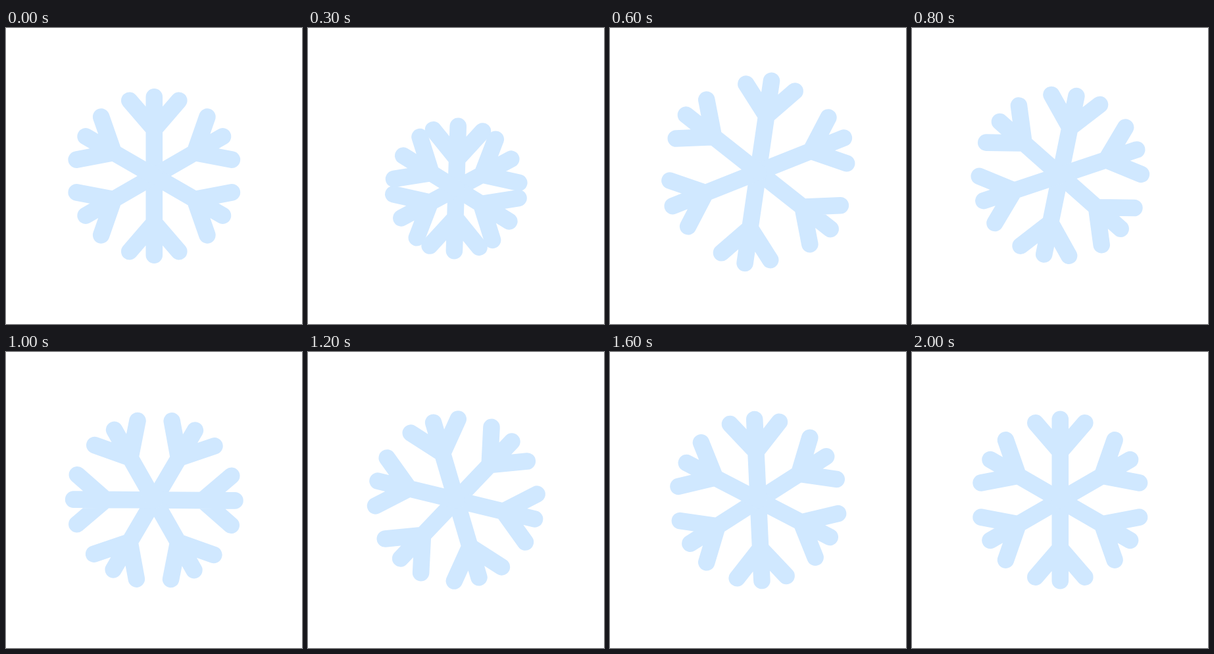
Animation of 450x450 px, one loop 2900 ms. Source, as an HTML page:

```html
<!DOCTYPE html>
<html lang="en">
<head>
<meta charset="utf-8">
<title>Snowflake</title>
<style>
  html, body { margin: 0; width: 100%; height: 100%; overflow: hidden; background: #fff; }
  svg { display: block; width: 100%; height: 100%; }
  path { fill: none; stroke: #d0e8ff; stroke-width: 25.6; stroke-linecap: round; }
</style>
</head>
<body>
<svg viewBox="0 0 450 450"><g id="flake"></g></svg>
<script>
const LOOP = 2900, MOVE = 2000, STEP = 100;
const CENTER = 225.3, ARM = 122.7, REACH = 117.2, SPREAD = 37.5, BRANCH = 43.5;

const progress = (t, from, to) => Math.min(1, Math.max(0, (t - from) / (to - from)));
const sine = u => (1 - Math.cos(Math.PI * u)) / 2;
const easeOut = u => 1 - (1 - u) ** 2.65;

// Rises from 0 to 1 at the peak and falls back to 0.
const pulse = (t, start, peak, end) =>
  sine(progress(t, start, peak)) - sine(progress(t, peak, end));

const flake = document.getElementById("flake");
const arms = Array.from({ length: 6 }, (_, i) => {
  const arm = document.createElementNS("http://www.w3.org/2000/svg", "path");
  arm.setAttribute("transform", `rotate(${i * 60})`);
  return flake.appendChild(arm);
});

function draw(time) {
  const t = Math.min(MOVE, Math.floor((time % LOOP) / STEP) * STEP);

  // Shrink and sink, then stretch and hop.
  const shrink = pulse(t, -70, 300, 570);
  const stretch = pulse(t, 300, 570, 800);
  const y = CENTER - 0.3 + 20 * pulse(t, 0, 350, 650) - 8 * pulse(t, 350, 650, 850);

  // A slow tilt runs into a quick turn to the next arm.
  const angle = 12 * sine(progress(t, 100, 900)) + 48 * easeOut(progress(t, 800, MOVE));

  const arm = ARM - 28 * shrink + 18 * stretch;
  const reach = REACH - 29 * shrink + 13 * stretch;
  const shape = `M0 0V${-arm}M${-SPREAD} ${-reach}L0 ${BRANCH - reach}L${SPREAD} ${-reach}`;
  arms.forEach(path => path.setAttribute("d", shape));
  flake.setAttribute("transform", `translate(${CENTER} ${y}) rotate(${angle})`);
}

const start = performance.now();
function tick() {
  draw(performance.now() - start);
  requestAnimationFrame(tick);
}
tick();
</script>
</body>
</html>
```
